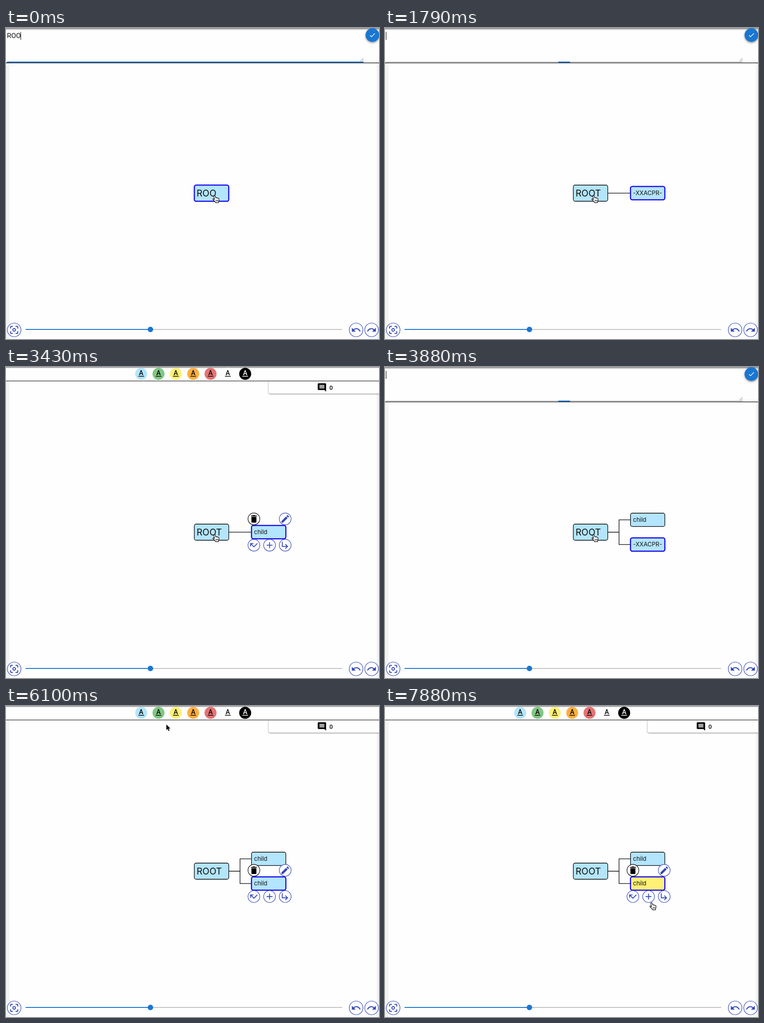
Animation of 820x683 px, one loop 8000 ms. Source, as an HTML page with a canvas:

```html
<!DOCTYPE html>
<html lang="en">
<head>
<meta charset="utf-8">
<title>Mind map editor</title>
<style>
html, body { margin: 0; width: 100%; height: 100%; overflow: hidden; background: #fefefe; }
canvas { display: block; }
</style>
</head>
<body>
<canvas id="stage" width="820" height="683"></canvas>
<script>
const ctx = document.getElementById('stage').getContext('2d');
const LOOP = 8000;
const INDIGO = '#3346b4', BLUE = '#1976d2', SKY = '#b3e5fc', YELLOW = '#fff176', PAPER = '#fefefe';
const SWATCHES = [SKY, '#81c784', YELLOW, '#ffb040', '#e57373', '#fefefe', '#000'];

const ICONS = {
  trash: 'M6 19c0 1.1.9 2 2 2h8c1.1 0 2-.9 2-2V7H6v12zM19 4h-3.5l-1-1h-5l-1 1H5v2h14V4z',
  pencil: 'M3 17.25V21h3.75L17.81 9.94l-3.75-3.75L3 17.25zM20.71 7.04c.39-.39.39-1.02 0-1.41l-2.34-2.34c-.39-.39-1.02-.39-1.41 0l-1.83 1.83 3.75 3.75 1.83-1.83z',
  left: 'M11 9l1.42 1.42L8.83 14H18V4h2v12H8.83l3.59 3.58L11 21l-6-6 6-6z',
  right: 'M19 15l-6 6-1.42-1.42L15.17 16H4V4h2v10h9.17l-3.59-3.58L13 9l6 6z',
  back: 'M19.59 7L12 14.59 6.41 9H11V7H3v8h2v-4.59l7 7 9-9L19.59 7z',
  plus: 'M19 13h-6v6h-2v-6H5v-2h6V5h2v6h6v2z',
  undo: 'M12.5 8c-2.65 0-5.05.99-6.9 2.6L2 7v9h9l-3.62-3.62c1.39-1.16 3.16-1.88 5.12-1.88 3.54 0 6.55 2.31 7.6 5.5l2.37-.78C21.08 11.03 17.15 8 12.5 8z',
  redo: 'M18.4 10.6C16.55 8.99 14.15 8 11.5 8c-4.65 0-8.58 3.03-9.96 7.22L3.9 16c1.05-3.19 4.05-5.5 7.6-5.5 1.95 0 3.73.72 5.12 1.88L13 16h9V7l-3.6 3.6z',
  focus: 'M5 15H3v4c0 1.1.9 2 2 2h4v-2H5v-4zM5 5h4V3H5c-1.1 0-2 .9-2 2v4h2V5zm14-2h-4v2h4v4h2V5c0-1.1-.9-2-2-2zm0 16h-4v2h4c1.1 0 2-.9 2-2v-4h-2v4zM12 8c-2.21 0-4 1.79-4 4s1.79 4 4 4 4-1.79 4-4-1.79-4-4-4zm0 6c-1.1 0-2-.9-2-2s.9-2 2-2 2 .9 2 2-.9 2-2 2z',
  check: 'M9 16.17L4.83 12l-1.42 1.41L9 19 21 7l-1.41-1.41z',
  comment: 'M21.99 4c0-1.1-.89-2-1.99-2H4c-1.1 0-2 .9-2 2v12c0 1.1.9 2 2 2h14l4 4-.01-18zM18 14H6v-2h12v2zm0-3H6V9h12v2zm0-3H6V6h12v2z'
};
for (const name in ICONS) ICONS[name] = new Path2D(ICONS[name]);

const HAND = new Path2D('M-2.2 1.2Q-1.6-.6 .2.2Q.9.6 1.2 2L2.1 5Q3.6 4 4.6 5.4Q6 4.6 7 6Q8.6 5.4 9.2 7.4Q9.8 10 8.6 12.6L8.2 15.6H1.6Q.8 13.5-1.6 11.2L-4 8.8Q-4.6 7.2-2.8 7.2L-.6 8.8Z');
const KNUCKLES = new Path2D('M2.6 9.5V13M4.7 9.5V13M6.7 9.5V13');
const ARROW = new Path2D('M0 0V12.5L3 9.8L5 14.4L7 13.5L5 9.1H9Z');

// Pointer stops: time, x, y, shape
const POINTER = [
  [0, 459, 368, 'hand'],
  [5800, 420, 215, 'arrow'], [5950, 368, 80, 'arrow'], [6100, 352.5, 40.5, 'arrow'],
  [6250, 334, 14, 'hand'], [6400, 326.5, 5, 'hand'], [6540, 336, 8, 'hand'],
  [6690, 352, 9, 'arrow'], [6840, 365, 8, 'hand'], [6990, 376, 12, 'hand'],
  [7280, 376, 11, 'hand'], [7430, 402, 95, 'arrow'], [7580, 495, 275, 'arrow'],
  [7730, 566, 395, 'arrow'], [7880, 586.5, 432, 'hand']
];

function rect(x, y, w, h, color) {
  ctx.fillStyle = color;
  ctx.fillRect(x, y, w, h);
}

function label(str, x, y, font, color = '#111') {
  ctx.font = font;
  ctx.fillStyle = color;
  ctx.fillText(str, x, y);
}

function disc(x, y, r, fill, stroke) {
  ctx.beginPath();
  ctx.arc(x, y, r, 0, Math.PI * 2);
  ctx.fillStyle = fill;
  ctx.fill();
  if (stroke) {
    ctx.strokeStyle = stroke;
    ctx.lineWidth = 1.2;
    ctx.stroke();
  }
}

function line(points, color, width) {
  ctx.beginPath();
  points.forEach(([x, y]) => ctx.lineTo(x, y));
  ctx.strokeStyle = color;
  ctx.lineWidth = width;
  ctx.stroke();
}

function icon(name, x, y, size, color) {
  ctx.save();
  ctx.translate(x - size / 2, y - size / 2);
  ctx.scale(size / 24, size / 24);
  ctx.fillStyle = color;
  ctx.fill(ICONS[name]);
  ctx.restore();
}

function button(name, x, y, color = INDIGO, r = 13, size = 22) {
  disc(x, y, r, PAPER, color);
  icon(name, x, y, size, color);
}

function topShadow(depth) {
  const g = ctx.createLinearGradient(0, 0, 0, depth);
  g.addColorStop(0, 'rgba(0,0,0,.5)');
  g.addColorStop(1, 'rgba(0,0,0,0)');
  rect(0, 0, 820, depth, g);
}

function node(n, selected) {
  ctx.beginPath();
  ctx.roundRect(n.x, n.y, n.w, n.h, 4);
  ctx.fillStyle = n.fill || SKY;
  ctx.fill();
  ctx.strokeStyle = selected ? '#1a0af0' : '#000';
  ctx.lineWidth = selected ? 2.5 : 1.3;
  ctx.stroke();
  const size = n.root ? 20 : 13;
  label(n.text, n.x + (n.root ? 5 : 5.5), n.y + n.h / 2 + (n.root ? 7.2 : 4.6), size + 'px Inter, sans-serif');
}

function nodeButtons(n) {
  const x1 = n.x + 5.3, x2 = n.x + n.w - 1.4, top = n.y - 14.4, low = n.y + n.h + 14;
  button('trash', x1, top, '#000');
  button('pencil', x2, top);
  button(n.root ? 'left' : 'back', x1, low);
  if (!n.root) button('plus', (x1 + x2) / 2, low);
  button('right', x2, low);
}

function editor(text, caret, grow) {
  rect(0, 0, 820, 76, PAPER);
  topShadow(5);
  const font = '15.3px Roboto, sans-serif';
  label(text, 2, 22, font);
  if (caret) rect(Math.round(2 + ctx.measureText(text).width), 8.5, 1, 17.5, '#000');
  rect(2, 74, 784, 1, '#999');
  const w = 784 * grow;
  rect(394 - w / 2, 73.7, w, 2.2, BLUE);
  line([[779, 73], [786, 66.5]], '#777', 1);
  line([[783, 73.5], [786, 70.5]], '#777', 1);
  rect(0, 76, 820, 1.2, '#000');
  ctx.save();
  ctx.shadowColor = 'rgba(0,0,0,.45)';
  ctx.shadowBlur = 4;
  ctx.shadowOffsetY = 2;
  disc(805.5, 15.5, 15, BLUE);
  ctx.restore();
  icon('check', 805.5, 15.5, 16, '#fff');
}

function toolbar() {
  rect(0, 0, 820, 31, PAPER);
  topShadow(3);
  rect(0, 30, 820, 1.3, '#333');
  ctx.textAlign = 'center';
  SWATCHES.forEach((color, i) => {
    const x = 297.2 + i * 38.1, ink = i === 6 ? '#fff' : '#000';
    disc(x, 15, 13.2, color);
    label('A', x, 18, '500 14.5px Roboto, sans-serif', ink);
    rect(x - 6.3, 19.7, 12.6, 1.5, ink);
  });
  ctx.textAlign = 'left';

  ctx.save();
  ctx.beginPath();
  ctx.rect(570, 32, 250, 32);
  ctx.clip();
  ctx.shadowColor = 'rgba(0,0,0,.5)';
  ctx.shadowBlur = 3;
  ctx.shadowOffsetY = 1;
  ctx.beginPath();
  ctx.roundRect(577.3, 24, 246, 34.5, 4);
  ctx.fillStyle = PAPER;
  ctx.fill();
  ctx.restore();
  icon('comment', 694.5, 45, 22, '#000');
  label('0', 711, 49.5, '500 13px Roboto, sans-serif', '#000');
}

function footer() {
  button('focus', 18, 663, INDIGO, 15, 23.5);
  rect(317, 661.2, 422, 1.7, '#b8b8b8');
  rect(43, 661, 274, 2, BLUE);
  disc(317.5, 662, 6, BLUE);
  button('undo', 769.7, 663, INDIGO, 15, 22.5);
  button('redo', 803.7, 663, INDIGO, 15, 22.5);
}

function pointer(t) {
  const [, x, y, shape] = POINTER.findLast(p => p[0] <= t);
  ctx.save();
  ctx.translate(x, y);
  ctx.lineJoin = 'round';
  if (shape === 'hand') {
    ctx.fillStyle = '#fff';
    ctx.strokeStyle = '#000';
    ctx.lineWidth = 1.2;
    ctx.fill(HAND);
    ctx.stroke(HAND);
    ctx.lineWidth = .9;
    ctx.stroke(KNUCKLES);
  } else {
    ctx.strokeStyle = '#fff';
    ctx.lineWidth = 2;
    ctx.stroke(ARROW);
    ctx.fillStyle = '#000';
    ctx.fill(ARROW);
  }
  ctx.restore();
}

// Typing session: the field opens, its underline spreads, then letters follow
function typing(t, start, word, last) {
  const step = Math.floor((t - start + 4) / 147);
  let count = Math.max(0, Math.min(word.length, step - 1));
  if (t < last) count = Math.min(count, word.length - 1);
  else count = word.length;
  return { text: word.slice(0, count), grow: [.033, .92][step] || 1 };
}

function scene(t) {
  const root = { x: 414, y: 345, w: 75.7, h: 35.5, root: true, text: 'ROOT' };
  const child = y => ({ x: 539.7, y, w: 75.5, h: 29.3, text: 'child' });
  const nodes = [root];
  let edit = null;

  if (t < 1040) {
    root.text = t < 300 ? 'ROO' : 'ROOT';
    edit = { text: root.text, grow: 1 };
  } else if (t >= 1790) {
    nodes.push(child(t < 3880 ? 348 : 321));
    if (t >= 3880) nodes.push(child(375.2));
    if (t < 3430) edit = typing(t, 1790, 'child', 2840);
    else if (t >= 3880 && t < 5360) edit = typing(t, 3880, 'child', 4760);
    if (edit) nodes.at(-1).text = edit.text || '-XXACPR-';
    if (t >= 7280) nodes.at(-1).fill = YELLOW;
  }
  return { nodes, edit };
}

function draw(t) {
  const { nodes, edit } = scene(t);
  const [root, ...kids] = nodes, active = nodes.at(-1);
  rect(0, 0, 820, 683, PAPER);
  const stripTop = !edit && !kids.length ? 408 : 31;
  rect(0, stripTop, 8, 683 - stripTop, '#f3f3f3');
  rect(815, stripTop, 5, 683 - stripTop, '#f3f3f3');

  for (const k of kids) {
    const y = k.y + k.h / 2;
    line([[489, 362.6], [514.5, 362.6], [514.5, y], [540, y]], '#000', 1.3);
  }
  nodes.forEach(n => node(n, n === active));
  if (edit) editor(edit.text, t < 750 || t >= 1040, edit.grow);
  else {
    toolbar();
    nodeButtons(active);
  }
  footer();
  pointer(t);
}

const begin = performance.now();
function tick() {
  draw((performance.now() - begin) % LOOP);
  requestAnimationFrame(tick);
}
tick();
</script>
</body>
</html>
```
